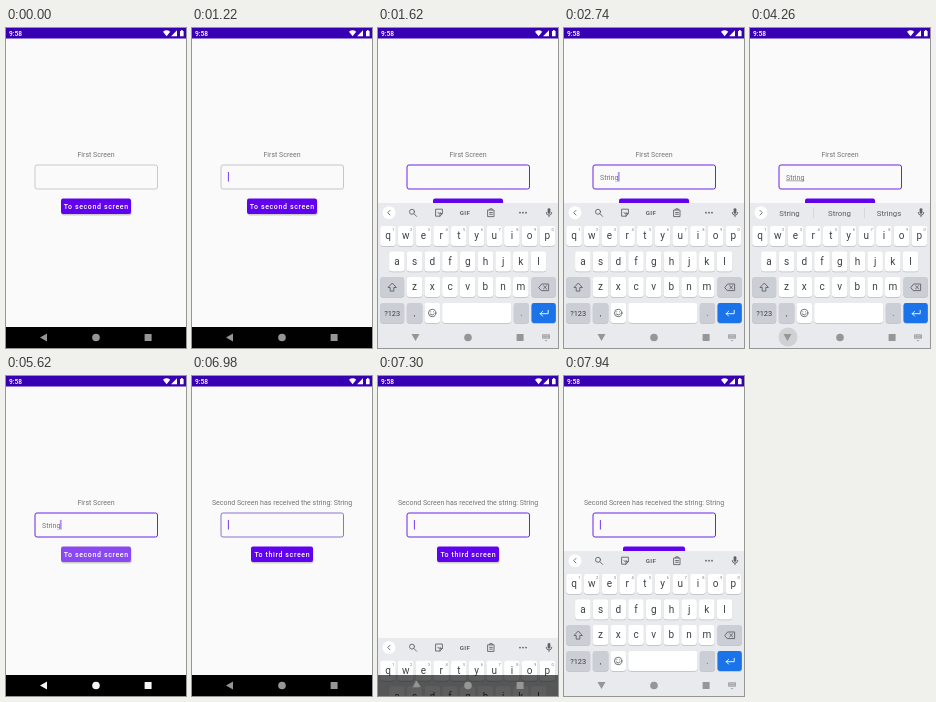
An HTML page that plays this animation: 180x320 px, repeating every 8 s.

```html
<!DOCTYPE html>
<html lang="en">
<head>
<meta charset="utf-8">
<title>Passing text between screens</title>
<style>
html, body { margin: 0; width: 100%; height: 100%; overflow: hidden; background: #fafafa; }
svg { display: block; width: 100vw; height: 100vh; font-family: Roboto, sans-serif; }
text { white-space: pre; }
.mid { text-anchor: middle; }
.label { font-size: 7px; fill: #747474; }
.button text { font-size: 7px; font-weight: 500; letter-spacing: .62px; fill: #fff; }
.line { fill: none; stroke: #5f6368; stroke-width: .9; stroke-linecap: round; stroke-linejoin: round; }
.box { transform-box: fill-box; transform-origin: center; }

/* Smooth motion */
.first, .second, .keyboard, .navbar, .back, .field { animation: 8s linear infinite; }
.first { animation-name: first; }
.second { animation-name: second; }
.keyboard { animation-name: slide; animation-timing-function: ease-out; }
.navbar { animation-name: navbar; }
.back { animation-name: back; }
.field { animation-name: field; }

/* Hard changes */
.press, .typed, .caret, .blink, .tools, .suggest, .ripple, .icons, .hide { animation: 8s step-end infinite; }
.press { animation-name: press; }
.typed { animation-name: typed; }
.caret { animation-name: caret; }
.blink { animation-name: blink; }
.tools { animation-name: tools; }
.suggest { animation-name: suggest; }
.ripple { animation-name: ripple; }
.icons { animation-name: icons; }
.hide { animation-name: hide; }

@keyframes first { 0%, 72.25% { opacity: 1 } 74.5%, 100% { opacity: 0 } }
@keyframes second { 0%, 72.25% { opacity: 0 } 74.5%, 100% { opacity: 1 } }
@keyframes slide {
  0%, 15.25% { transform: translateY(146px) }
  18.75%, 56.25% { transform: none }
  60%, 90.25% { transform: translateY(146px) }
  94%, 100% { transform: none }
}
@keyframes navbar {
  0%, 15.25% { opacity: 1 } 18%, 56.25% { opacity: 0 }
  60%, 90.25% { opacity: 1 } 93%, 100% { opacity: 0 }
}
@keyframes back {
  0%, 15.25% { transform: none } 18%, 56.25% { transform: rotate(-90deg) }
  60%, 90.25% { transform: none } 93%, 100% { transform: rotate(-90deg) }
}
@keyframes field {
  0%, 15.2% { stroke: #bdbdbd; stroke-width: .8px }
  17.25%, 72.25% { stroke: #6a22e8; stroke-width: 1px }
  74.5%, 86% { stroke: #bdbdbd; stroke-width: .8px }
  87.2% { stroke: #7356c8; stroke-width: .8px }
  89.25%, 100% { stroke: #6a22e8; stroke-width: 1px }
}
@keyframes press { 0% { fill: #6002ee } 68.25% { fill: #8a48f0 } 72.25% { fill: #6002ee } }
@keyframes typed {
  0% { clip-path: inset(0 100% 0 0) }
  23.25% { clip-path: inset(0 77% 0 0) }
  25.25% { clip-path: inset(0 65% 0 0) }
  27.25% { clip-path: inset(0 42% 0 0) }
  30.25% { clip-path: inset(0 21% 0 0) }
  32.25% { clip-path: inset(0) }
  72.25%, 100% { clip-path: inset(0 100% 0 0) }
}
@keyframes caret {
  0% { transform: none }
  23.25% { transform: translateX(4.2px) }
  25.25% { transform: translateX(6.4px) }
  27.25% { transform: translateX(10.6px) }
  30.25% { transform: translateX(14.5px) }
  32.25% { transform: translateX(18.4px) }
  72.25%, 100% { transform: none }
}
@keyframes blink {
  0% { opacity: 0 } 15.25% { opacity: 1 } 19% { opacity: 0 }
  23.25% { opacity: 1 } 49.25% { opacity: 0 } 56.25% { opacity: 1 }
  60.25% { opacity: 0 } 68.25% { opacity: 1 } 72.25% { opacity: 0 }
  87.25%, 100% { opacity: 1 }
}
@keyframes tools { 0% { opacity: 1 } 37.25% { opacity: 0 } 61%, 100% { opacity: 1 } }
@keyframes suggest { 0% { opacity: 0 } 37.25% { opacity: 1 } 61%, 100% { opacity: 0 } }
@keyframes ripple { 0% { opacity: 0 } 53.25% { opacity: 1 } 56.25%, 100% { opacity: 0 } }
@keyframes icons { 0% { fill: #969696 } 60.25% { fill: #f4f4f4 } 74.5%, 100% { fill: #969696 } }
@keyframes hide { 0% { opacity: 0 } 18% { opacity: 1 } 56.25% { opacity: 0 } 93%, 100% { opacity: 1 } }
</style>
</head>
<body>
<svg viewBox="0 0 180 320" preserveAspectRatio="none">
  <rect width="180" height="320" fill="#fafafa"/>

  <g class="first">
    <text class="label mid" x="90" y="128.5">First Screen</text>
    <g class="button">
      <rect x="55.5" y="172" width="70" height="15.5" rx="2" fill="#000" opacity=".18"/>
      <rect class="press" x="55" y="170.5" width="70" height="15.5" rx="2"/>
      <text class="mid" x="90.3" y="181">To second screen</text>
    </g>
  </g>
  <g class="second">
    <text class="label mid" x="90" y="128.5">Second Screen has received the string: String</text>
    <g class="button">
      <rect x="59.5" y="172" width="62" height="15.5" rx="2" fill="#000" opacity=".18"/>
      <rect x="59" y="170.5" width="62" height="15.5" rx="2" fill="#6002ee"/>
      <text class="mid" x="90.3" y="181">To third screen</text>
    </g>
  </g>

  <rect class="field" x="29" y="137" width="122.5" height="24" rx="2" fill="none"/>
  <text class="label typed" x="36" y="151.5">String</text>
  <path class="suggest" d="M36 152.8h18.3" stroke="#747474" stroke-width=".6"/>
  <g class="caret"><path class="blink" d="M36.4 144v9.5" stroke="#6a22e8" stroke-width=".9"/></g>

  <g class="keyboard">
    <rect y="175" width="180" height="145" fill="#e8eaed"/>
    <circle cx="11" cy="184.7" r="6.5" fill="#fff"/>
    <g class="tools">
      <path class="line" d="M12 182.4l-2.3 2.3 2.3 2.3"/>
      <g class="line">
        <circle cx="34" cy="183.8" r="2.5"/><path d="M36 185.8l2.6 2.6"/>
        <path d="M58 181.2h6.4v4.4l-2.4 2.6h-4zM64.4 185.6h-2.4v2.6M59.8 184.8q1.2 1.6 2.6 0"/>
        <path d="M110 182h6v6.6h-6zM111.8 182v-1.2h2.4v1.2M111.6 184.5h2.8M111.6 186.3h2.8"/>
      </g>
      <text class="mid" x="87" y="187" font-size="6.2" font-weight="700" fill="#5f6368" letter-spacing=".4">GIF</text>
      <g fill="#5f6368"><circle cx="142" cy="184.7" r=".9"/><circle cx="145" cy="184.7" r=".9"/><circle cx="148" cy="184.7" r=".9"/></g>
    </g>
    <g class="suggest">
      <path class="line" d="M10 182.4l2.3 2.3-2.3 2.3"/>
      <path d="M63.5 179.5v10.5M114.5 179.5v10.5" stroke="#cfd1d5" stroke-width=".7"/>
      <g class="mid" font-size="7.8" fill="#5a5d62">
        <text x="39.5" y="187.5">String</text><text x="89.5" y="187.5">Strong</text><text x="139" y="187.5">Strings</text>
      </g>
    </g>
    <rect x="169.6" y="180.2" width="2.8" height="5.6" rx="1.4" fill="#5f6368"/>
    <path class="line" d="M168.2 184.4q0 2.8 2.8 2.8t2.8-2.8M171 187.2v1.6"/>
    <g id="keys"></g>
    <g class="line">
      <path d="M14 255.3l-4 4.2h2.2v3.6h3.6v-3.6h2.2z"/>
      <path d="M161 259.3l2.6-3.3h7v6.6h-7zM165.6 257.8l3 3m0-3l-3 3"/>
      <circle cx="54.2" cy="285" r="3.7"/><path d="M52.2 286q2 2.4 4 0M52.8 283.8v.1M55.6 283.8v.1"/>
      <path d="M170.2 282.3v3.4h-8m2.4-2.4l-2.4 2.4 2.4 2.4" stroke="#fff"/>
    </g>
  </g>

  <rect class="navbar" y="299" width="180" height="21"/>
  <circle class="ripple" cx="38" cy="309" r="9.5" fill="#cfd1d4"/>
  <g class="icons">
    <g class="back box"><path d="M34 309.5l7-4v8z"/></g>
    <circle cx="90" cy="309.5" r="3.8"/>
    <rect x="138.6" y="306" width="7" height="7" rx=".5"/>
  </g>
  <g class="hide">
    <rect x="164" y="306.2" width="8" height="4.6" rx=".7" fill="#a4a6a9"/>
    <path d="M165.2 307.7h5.6M165.2 309.3h5.6" stroke="#e8eaed" stroke-width=".6" stroke-dasharray=".8 .5"/>
    <path d="M166.5 312h3l-1.5 1.5z" fill="#a4a6a9"/>
  </g>

  <rect width="180" height="10.5" fill="#3700b3"/>
  <g fill="#fff">
    <text x="3" y="7.7" font-size="6.6" font-weight="500">9:58</text>
    <path d="M157 3.7q3.6-2.8 7.2 0l-3.6 4.5zM171 2.3v5.9h-5.9zM174 2.9h1v-.8h1.6v.8h1v5.4H174z"/>
  </g>
</svg>
<script>
const keys = document.getElementById('keys');
const pitch = 17.7;
let markup = '';

function key(x, y, width, label = '', fill = '#fff', size = 10) {
  markup += `<rect x="${x}" y="${y + .7}" width="${width}" height="20" rx="2.4" fill="#b9bcc1"/>
    <rect x="${x}" y="${y}" width="${width}" height="20" rx="2.4" fill="${fill}"/>
    <text class="mid" x="${x + width / 2}" y="${y + 10 + size * .34}" font-size="${size}" fill="#3c4043">${label}</text>`;
}

function row(letters, x, y) {
  [...letters].forEach((letter, i) => key(x + i * pitch, y, 15.6, letter));
}

row('qwertyuiop', 2.2, 198);
row('asdfghjkl', 11.1, 223.5);
row('zxcvbnm', 28.8, 249);
[...'1234567890'].forEach((digit, i) => {
  markup += `<text class="mid" x="${15.4 + i * pitch}" y="202.7" font-size="4" fill="#777a7e">${digit}</text>`;
});

const grey = '#cbced4';
key(2.2, 249, 24, '', grey);
key(153.5, 249, 24.3, '', grey);
key(2.2, 275, 24, '?123', grey, 7.4);
key(28.8, 275, 15.6, ',', grey, 8);
key(46.5, 275, 15.6);
key(64.2, 275, 69);
key(135.8, 275, 15.2, '.', grey, 8);
key(153.5, 275, 24.3, '', '#1a73e8');
keys.innerHTML = markup;
</script>
</body>
</html>
```
